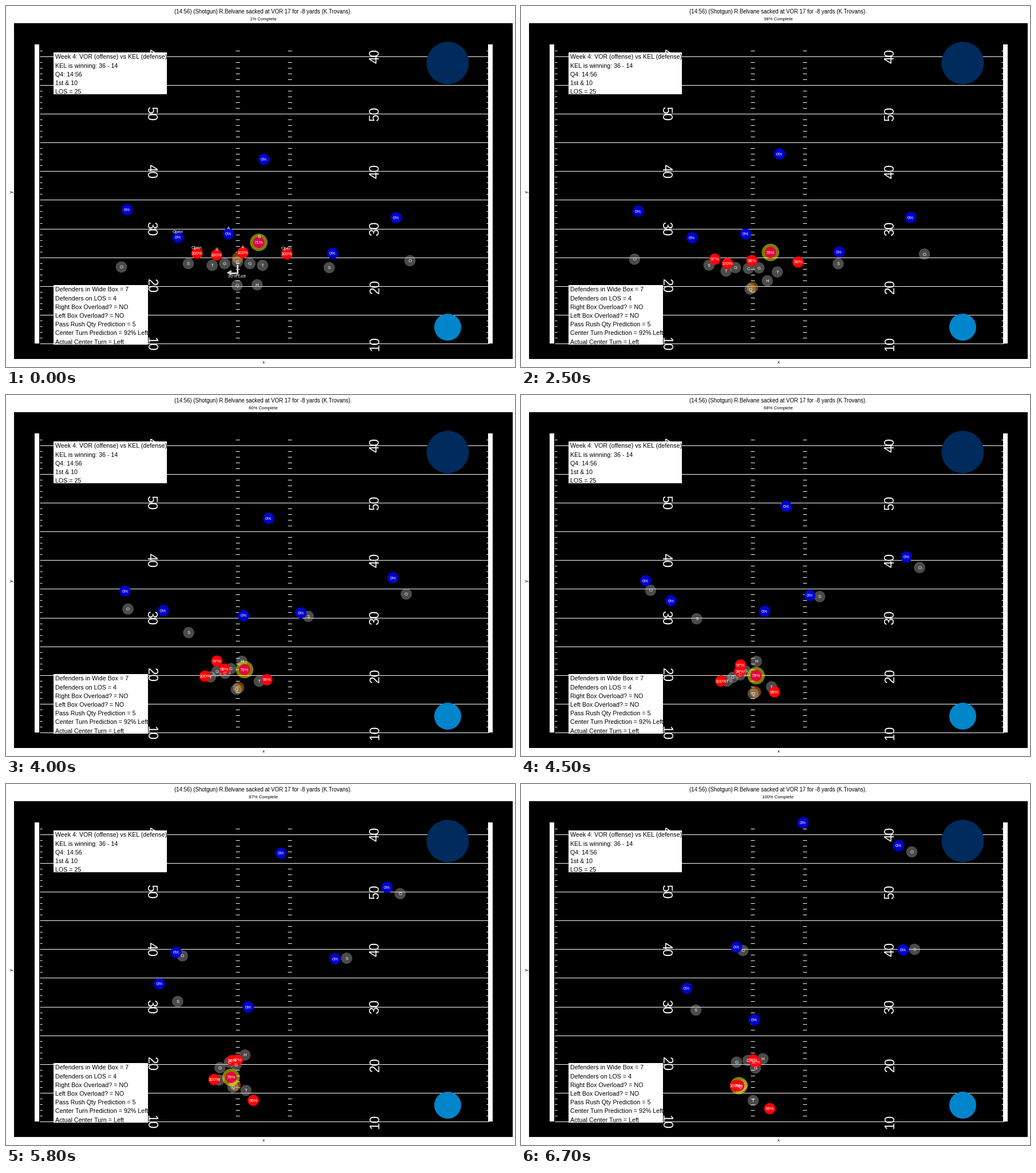
These frames come from a looping animation (889 by 630 pixels, 6.8 s). A matplotlib script:

```python
import matplotlib.pyplot as plt
import numpy as np
from matplotlib.animation import FuncAnimation
from matplotlib.patches import Circle, Rectangle

W, H, DPI = 889, 630, 64
PT = 72 / DPI                      # points per pixel
FRAMES, SNAP, GO = 68, 6, 15       # pre-snap, freeze from SNAP to GO, then play
SMALL = 7.7

plt.rcParams["font.family"] = "Liberation Sans"
fig = plt.figure(figsize=(W / DPI, H / DPI), dpi=DPI, facecolor="white")
ax = fig.add_axes([0, 0, 1, 1])
ax.set(xlim=(-0.5, W - 0.5), ylim=(H - 0.5, -0.5))   # whole numbers are pixel centres
ax.axis("off")


def text(x, y, s, px=SMALL, color="white", ha="center", z=9, **kw):
    return ax.text(x, y, s, fontsize=px * PT, color=color, ha=ha,
                   va="baseline", zorder=z, **kw)


def rect(x0, y0, x1, y1, color, z):
    ax.add_patch(Rectangle((x0 - 0.5, y0 - 0.5), x1 - x0, y1 - y0,
                           fc=color, lw=0, zorder=z))


def disc(x, y, r, color, z, alpha=None):
    return ax.add_patch(Circle((x, y), r, fc=color, lw=0, alpha=alpha, zorder=z))


def line(xs, ys, color="white", px=1.0, z=1):
    return ax.plot(xs, ys, color=color, lw=px * PT, zorder=z,
                   solid_capstyle="butt", solid_joinstyle="miter")[0]


def arrow(pts, color, head=10):
    """Polyline with an open arrow head; returns its two artists."""
    pts = np.array(pts, float)
    tip, back = pts[-1], pts[-2] - pts[-1]
    a = np.arctan2(back[1], back[0]) + np.radians([30, -30])
    ends = tip + head * np.column_stack([np.cos(a), np.sin(a)])
    vee = np.array([ends[0], tip, ends[1]])
    return [line(*pts.T, color, 3, 5), line(*vee.T, color, 3, 5)]


def yard(n):
    return 588.8 - 10.035 * (n - 10)


def field():
    rect(14, 30, 885, 616, "black", 0)
    rect(50, 67, 58, 589, "white", 1)
    rect(842, 67, 850, 589, "white", 1)
    for n in range(10, 62):
        y = yard(n)
        if n % 5 == 0:
            line([58, 842], [y, y])
        else:
            for x0, x1 in ((58, 62), (400, 407), (491, 498), (838, 842)):
                line([x0, x1], [y, y])
    for n in range(10, 61, 10):
        label = str(50 - abs(50 - n))
        for x, rot in ((246, 270), (651, 90)):
            text(x, yard(n), label, 22.6, z=1, rotation=rot, rotation_mode="anchor")
    disc(771, 99, 37, "#002b5c", 2)
    disc(771, 560, 23.5, "#0085ca", 2)


def info(x1, y0, y1, base, rows):
    rect(83, y0, x1, y1, "white", 2)
    for k, row in enumerate(rows):
        text(86, base + 15.17 * k, row, 10.6, "black", "left", 3)


def heat(p):
    """Blue at 0, red at 1."""
    return (p ** 0.45, 0, 0.8 * (1 - p) ** 0.8)


def ease(i, start, end):
    u = np.clip((i - start) / (end - start), 0, 1)
    return u * u * (3 - 2 * u)


def route(*pts):
    """Smooth path from rest through points evenly spread over the play."""
    p = np.array(pts, float)
    v = np.gradient(p, axis=0)
    v[0] = 0

    def at(i):
        s = max(i - GO, 0) / (FRAMES - 1 - GO) * (len(p) - 1)
        k = min(int(s), len(p) - 2)
        u = s - k
        return (p[k] * (1 + 2 * u) * (1 - u) ** 2 + p[k + 1] * u * u * (3 - 2 * u)
                + v[k] * u * (1 - u) ** 2 + v[k + 1] * u * u * (u - 1))
    return at


def cover(man, start, gap):
    """Follow a receiver, closing from the starting spot to a tight gap."""
    loose = np.array(start) - man(GO)

    def at(i):
        return man(i) + loose + (np.array(gap) - loose) * ease(i, GO, 53)
    return at


class Blocker:
    def __init__(self, name, path):
        self.path = path
        self.dot = disc(0, 0, 9.8, "#bebebe", 3, 0.4)
        self.tag = text(0, 0, name)

    def draw(self, i):
        x, y = self.path(i)
        self.dot.set_center((x, y))
        self.tag.set_position((x, y + 2.6))


class Defender:
    def __init__(self, path, odds=(0, 0), gap="", halo=False):
        self.path, self.odds = path, odds
        self.dot = disc(0, 0, 9.8, "red", 7)
        self.halo = disc(0, 0, 15.2, "yellow", 6, 0.5) if halo else None
        self.tag = text(0, 0, "")
        self.gap = text(0, 0, gap)

    def draw(self, i):
        x, y = self.path(i)
        a, b = self.odds
        p = round(a + (b - a) * min(i / SNAP, 1))
        self.dot.set_center((x, y))
        self.dot.set_facecolor(heat(p / 100))
        if self.halo:
            self.halo.set_center((x, y))
        self.tag.set_text(f"{p}%")
        self.tag.set_position((x, y + 2.6))
        self.gap.set_position((x, y - 7.4))
        self.gap.set_visible(i <= GO)


field()
info(281, 81, 154, 92, [
    "Week 4: VOR (offense) vs KEL (defense)", "KEL is winning: 36 - 14",
    "Q4: 14:56", "1st & 10", "LOS = 25"])
info(248, 487, 591, 498, [
    "Defenders in Wide Box = 7", "Defenders on LOS = 4",
    "Right Box Overload? = NO", "Left Box Overload? = NO",
    "Pass Rush Qty Prediction = 5", "Center Turn Prediction = 92% Left",
    "Actual Center Turn = Left"])
text(448, 12.5, "(14:56) (Shotgun) R.Belvane sacked at VOR 17 for -8 yards (K.Trovans).",
     9.6, "black")
progress = text(448.5, 24.7, "", SMALL, "black")
text(449, 624, "x", 8, "black")
text(11, 323, "y", 8, "black", rotation=90, rotation_mode="anchor")


def spot(k):
    """Stance of the k-th lineman from the centre."""
    return 403.5 + 22 * k, 446 + 3 * abs(k)


passer = route((403, 487), (398, 502), (405, 526), (382, 528))
wide_l = route((201, 455), (201, 417), (246, 317), (387, 290))
wide_r = route((705, 444), (702, 404), (693, 259), (682, 118))
slot_l = route((318, 449), (332, 445), (299, 376), (305, 394))
slot_r = route((564, 456), (543, 430), (530, 326), (687, 288))
line_paths = [
    route(spot(-2), (357, 493), (381, 528)),
    route(spot(-1), (368, 466), (371, 498), (376, 485)),
    route(spot(0), (382, 486), (396, 482)),
    route(spot(1), (392, 478), (409, 495)),
    route(spot(2), (441, 501), (405, 552)),
]
rushers = [
    Defender(route((441, 412), (415, 481), (380, 526)), (71, 79), "B", halo=True),
    Defender(route((413, 430), (381, 479), (405, 481)), (100, 98), "A"),
    Defender(route((333, 431), (348, 453), (394, 476), (410, 485)), (100, 97), "Open"),
    Defender(route((367, 434), (347, 492), (374, 526)), (100, 100), "B"),
    Defender(route((490, 432), (473, 467), (434, 534), (434, 566)), (100, 99), "Open"),
]
players = [Blocker(n, p) for n, p in zip("TGCGT", line_paths)]
players += [Blocker(n, p) for n, p in zip("OSSOQ", (wide_l, slot_l, slot_r, wide_r, passer))]
players += [
    Blocker("H", route((438, 486), (411, 464), (422, 479))),
    Defender(cover(wide_l, (211, 355), (-11, -6))),
    Defender(cover(slot_r, (570, 431), (-20, 1))),
    Defender(cover(wide_r, (681, 369), (-23, -11))),
    Defender(route((300, 403), (292, 398), (256, 348), (289, 356)), gap="Open"),
    Defender(route((388, 397), (399, 395), (430, 375), (407, 411)), gap="A"),
    Defender(route((450, 267), (459, 211), (492, 67))),
]
players += rushers

snap_spot = np.array((404, 439))
ball = disc(*snap_spot, 9.8, "darkorange", 2.5, 0.45)

guess = arrow([(403, 450), (403, 465), (388, 465)], "lightgray", 6)
guess.append(text(403, 474, "92% Left"))

# Linemen slide left except the right tackle; rushers point down their path.
moves = []
for k in range(-2, 3):
    (x, y), side = spot(k), 1 if k == 2 else -1
    moves += arrow([(x, y + 5), (x, y + 25), (x + 22 * side, y + 25)],
                   "forestgreen" if side > 0 else "dodgerblue")
for r in rushers:
    moves += arrow([r.path(GO), r.path(GO + 19)], "red")


def update(i):
    progress.set_text(f"{round(100 * (i + 1) / FRAMES)}% Complete")
    for p in players:
        p.draw(i)
    held = passer(i) + (4, -3)
    ball.set_center(snap_spot + (held - snap_spot) * ease(i, GO, GO + 8))
    for art in guess:
        art.set_visible(i < SNAP)
    for art in moves:
        art.set_visible(SNAP <= i <= GO)


anim = FuncAnimation(fig, update, frames=FRAMES, init_func=lambda: update(0),
                     interval=100, repeat=True, repeat_delay=0)
plt.show()
```
